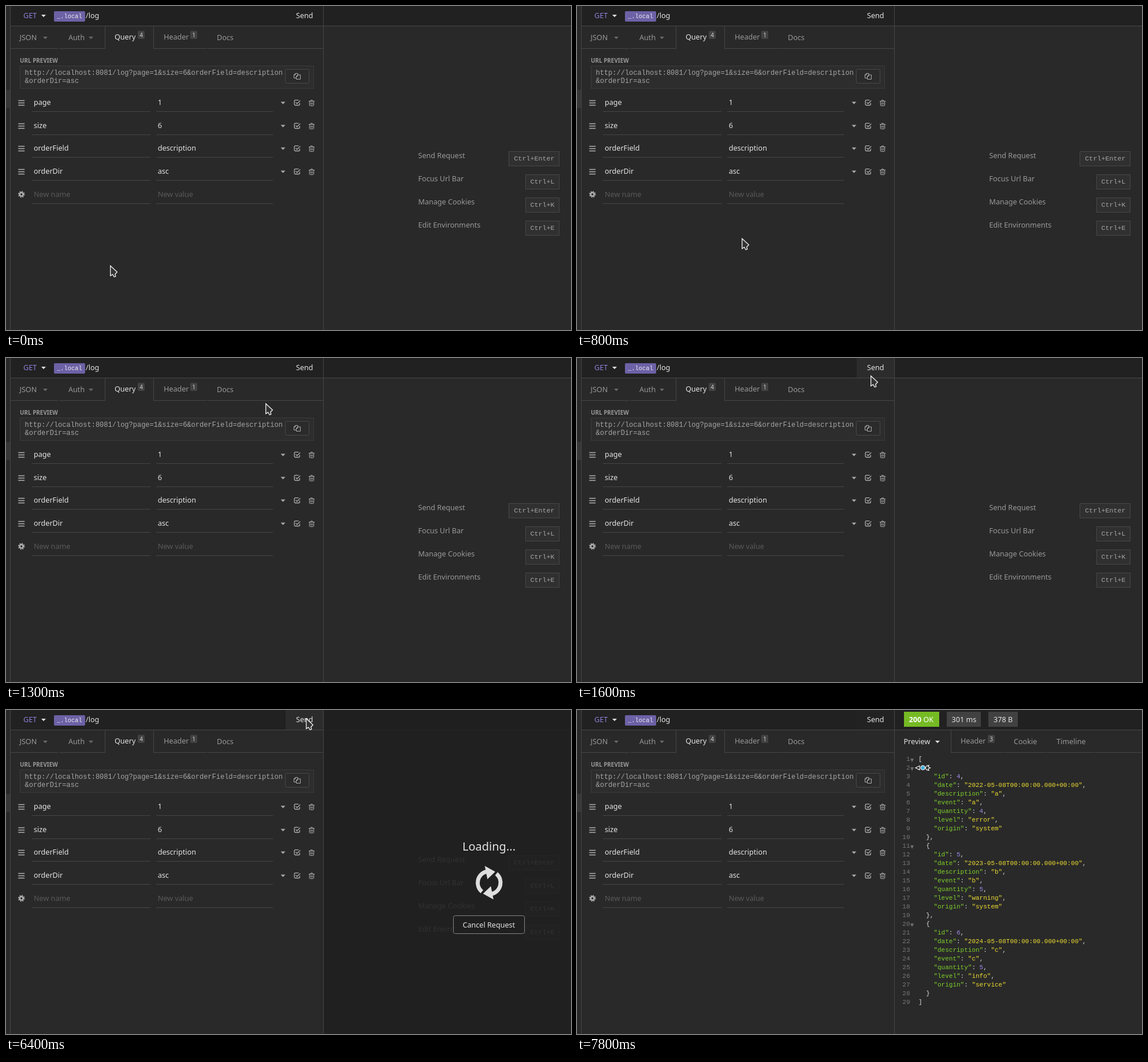
Recreate the animation shown at these times as an HTML page. Size 978x560 px, loop 8000 ms.

```html
<!DOCTYPE html>
<html lang="en">
<head>
<meta charset="utf-8">
<title>Sending a request</title>
<style>
html, body { margin: 0; width: 100%; height: 100%; overflow: hidden; background: #292929; }
svg { display: block; width: 978px; height: 560px; }
text { font: 12.6px "Noto Sans", sans-serif; fill: #999; }
.bright { fill: #e4e4e4; }
.hint { fill: #5a5a5a; }
.label { font-size: 9.9px; font-weight: 700; }
.badge { font-size: 10px; fill: #ccc; text-anchor: middle; }
.mono { font: 12px "Liberation Mono", monospace; fill: #a5a5a5; }
.tag { font-size: 10.4px; fill: #eee; }
.kbd { font-size: 11.7px; text-anchor: end; }
.code { font-size: 11px; fill: #ddd; }
.number { fill: #777; text-anchor: end; }
.key { fill: #7ecf2b; }
.string { fill: #ecdb32; }
.value { fill: #a18aeb; }
.line { fill: none; stroke: #464646; shape-rendering: crispEdges; }
.icon { fill: none; stroke: #b0b0b0; }

.anim { animation: 8s step-end infinite; }
#pointer { animation-name: move; }
#hover { animation-name: hover; }
#loading { animation-name: loading; }
#response { animation-name: response; }
#busy { animation-name: busy; }

/* one pointer step every 100 ms */
@keyframes move {
  0% { transform: translate(180px, 448px); }
  7.5% { transform: translate(196px, 443px); }
  8.75% { transform: translate(240px, 426px); }
  10% { transform: translate(285px, 401px); }
  11.25% { transform: translate(329px, 353px); }
  12.5% { transform: translate(367px, 285px); }
  13.75% { transform: translate(400px, 210px); }
  15% { transform: translate(427px, 136px); }
  16.25% { transform: translate(449px, 78px); }
  17.5% { transform: translate(485px, 53px); }
  18.75% { transform: translate(500px, 39px); }
  20% { transform: translate(508px, 30px); }
  21.25% { transform: translate(513px, 23px); }
  22.5% { transform: translate(516px, 19px); }
  23.75% { transform: translate(518px, 16px); }
  25% { transform: translate(519px, 14px); visibility: visible; }
  97.5%, 100% { transform: translate(519px, 14px); visibility: hidden; }
}
@keyframes hover { 0% { opacity: 0; } 20% { opacity: 1; } 97.5%, 100% { opacity: .2; } }
@keyframes loading { 0% { visibility: hidden; } 80% { visibility: visible; } 86.25%, 100% { visibility: hidden; } }
@keyframes response { 0% { visibility: hidden; } 86.25%, 100% { visibility: visible; } }
@keyframes busy { 0% { visibility: hidden; } 97.5%, 100% { visibility: visible; } }
</style>
</head>
<body>
<svg viewBox="0 0 978 560">
  <defs>
    <path id="caret" d="M-4-2H4L0 2.3Z"/>
    <path id="menu" class="icon" stroke-width="1.4" d="M-5.5-4H5.5M-5.5 0H5.5M-5.5 4H5.5"/>
    <path id="check" class="icon" stroke-width="1.3" d="M4.3 .5V3Q4.3 4.5 2.8 4.5H-3.3Q-4.8 4.5-4.8 3V-2.8Q-4.8-4.3-3.3-4.3H2.5M-2.6-.6L-.2 1.8 5.4-3.6"/>
    <g id="trash" class="icon">
      <path d="M-5-3H5M-1.8-3L-1.3-4.7H1.3L1.8-3M-3.7-3V3.5Q-3.7 5-2.5 5H2.5Q3.7 5 3.7 3.5V-3"/>
      <path d="M-1.7-1V3.2M0-1V3.2M1.7-1V3.2" stroke-width=".8"/>
    </g>
    <g id="gear" class="icon">
      <circle r="3" stroke-width="2.6"/>
      <circle r="4.9" stroke-width="1.8" stroke-dasharray="1.95 1.9"/>
    </g>
    <g id="half" fill="#dedede">
      <path d="M-12.5 15.5A20 20 0 0 1-5-19.2" fill="none" stroke="#dedede" stroke-width="7"/>
      <path d="M-7.5-29L10.5-19-3-6Z"/>
    </g>
  </defs>

  <rect width="978" height="560" fill="#292929"/>
  <rect x="8" width="970" height="34" fill="#212121"/>
  <rect y="145" width="7" height="31" fill="#373737"/>
  <rect id="hover" class="anim" x="484" width="65" height="34" fill="#2c2c2c"/>
  <path class="line" d="M7.5 0V560M549.5 0V560M8 34.5H978M8 73.5H90M92 73.5H171.5V35M255.5 35V73.5H348M349 73.5H549"/>

  <text x="30" y="21" style="fill:#8f7fdb">GET</text>
  <use href="#caret" x="65" y="17" fill="#ddd"/>
  <rect x="83" y="9" width="54" height="18" rx="2" fill="#6d61a6"/>
  <text class="mono tag" x="88" y="21">_.local</text>
  <text class="bright" x="138" y="21">/log</text>
  <text class="bright" x="502" y="21">Send</text>

  <text x="23.5" y="59">JSON</text>
  <use href="#caret" x="68" y="55" fill="#686868"/>
  <text x="108" y="59">Auth</text>
  <use href="#caret" x="147" y="55" fill="#686868"/>
  <text class="bright" x="188" y="58">Query</text>
  <rect x="228" y="43" width="12" height="14" rx="2" fill="#424242"/>
  <text class="badge" x="234" y="54">4</text>
  <text x="273" y="58">Header</text>
  <rect x="319" y="43" width="12" height="14" rx="2" fill="#424242"/>
  <text class="badge" x="325" y="54">1</text>
  <text x="365" y="59">Docs</text>

  <text class="label" x="24" y="98">URL PREVIEW</text>
  <rect x="24.5" y="103.5" width="508" height="39" fill="#2d2d2d" stroke="#3b3b3b"/>
  <text class="mono" x="32.5" y="119">http://localhost:8081/log?page=1&amp;size=6&amp;orderField=description</text>
  <text class="mono" x="32.5" y="133">&amp;orderDir=asc</text>
  <rect x="483.5" y="109.5" width="41" height="24" rx="2" fill="#2b2b2b" stroke="#484848"/>
  <path class="icon" d="M502 124.5H498.500V119L501 116.500H505V119M501 116.500V119H498.500M502.500 126.500V121.500L505 119H509.500V126.500ZM505 119V121.500H502.500"/>

  <g id="rows"></g>
  <g id="shortcuts"></g>

  <g id="loading" class="anim">
    <rect x="550" width="428" height="560" fill="#1f1f1f" opacity=".85"/>
    <text class="bright" x="790" y="243" style="font-size:20px">Loading...</text>
    <g transform="translate(836.3 298.500)">
      <use href="#half"/>
      <use href="#half" transform="rotate(180)"/>
    </g>
    <rect x="774.5" y="355.5" width="123" height="31" rx="3" fill="#1f1f1f" stroke="#858585"/>
    <text class="bright" x="790.5" y="376">Cancel Request</text>
  </g>

  <g id="response" class="anim">
    <rect x="550" width="428" height="560" fill="#292929"/>
    <rect x="550" width="428" height="34" fill="#212121"/>
    <path class="line" d="M550 34.5H978M647.5 35V73.5H739M740 73.5H813M814 73.5H896M897 73.5H978"/>
    <rect x="566" y="3" width="61" height="26" fill="#75ba24"/>
    <text x="574.5" y="21" style="fill:#fff"><tspan font-weight="700">200</tspan> OK</text>
    <rect x="640" y="3" width="59" height="26" fill="#414141"/>
    <text class="bright" x="648.5" y="21">301 ms</text>
    <rect x="712" y="3" width="51" height="26" fill="#414141"/>
    <text class="bright" x="721" y="21">378 B</text>
    <text class="bright" x="565.5" y="59">Preview</text>
    <use href="#caret" x="624" y="55" fill="#ddd"/>
    <text x="664" y="58">Header</text>
    <rect x="711" y="43" width="12" height="14" rx="2" fill="#424242"/>
    <text class="badge" x="717" y="54">3</text>
    <text x="756" y="59">Cookie</text>
    <text x="830" y="59">Timeline</text>
    <g id="code"></g>
  </g>

  <g id="pointer" class="anim">
    <path d="M.7 1V18.300L4.500 16 7.200 20.300 9.800 19.300 8.800 15.500 12.400 11.700Z" fill="#343434" stroke="#f2f2f2" stroke-width="1.3"/>
  </g>
  <g id="busy" class="anim" fill="#222" stroke="#f2f2f2" stroke-width="1.2">
    <path d="M593 96.500L586 100 593 103.500ZM606 96H609L607.500 98 611.500 100 607.500 102 609 104H606Q603.500 102.500 603.500 100T606 96Z"/>
    <circle cx="598.7" cy="99.8" r="3.7" fill="#3fa9dd"/>
  </g>
</svg>
<script>
const fill = (id, items, draw) =>
  document.getElementById(id).innerHTML = items.map(draw).join('');

const params = [['page', '1'], ['size', '6'], ['orderField', 'description'],
  ['orderDir', 'asc'], ['New name', 'New value']];
fill('rows', params, ([name, value], i) => {
  const y = Math.round(167 + i * 39.6), isNew = i === 4;
  const tone = isNew ? 'hint' : 'bright';
  const base = y + (isNew ? 4.5 : 4);
  const rule = Math.floor(182.6 + i * 39.6) + .5;
  const tools = isNew ? '' : `<use href="#caret" x="479.5" y="${y + .5}" fill="#aaa"/>
    <use href="#check" x="504" y="${y}"/><use href="#trash" x="529" y="${y + .5}"/>`;
  return `<use href="#${isNew ? 'gear' : 'menu'}" x="26.700" y="${y + .5}"/>
    <text class="${tone}" x="48" y="${base}">${name}</text>
    <text class="${tone}" x="262.700" y="${base}">${value}</text>
    <path class="line" d="M45 ${rule}H250M260 ${rule}H462"/>${tools}`;
});

const shortcuts = [['Send Request', 'Enter'], ['Focus Url Bar', 'L'],
  ['Manage Cookies', 'K'], ['Edit Environments', 'E']];
fill('shortcuts', shortcuts, ([label, key], i) => {
  const y = 251 + i * 40, width = key.length > 1 ? 87 : 58;
  return `<text x="713.5" y="${y + 12}">${label}</text>
    <rect x="${957.5 - width}" y="${y + .5}" width="${width}" height="25" fill="#303030" stroke="#474747"/>
    <text class="mono kbd" x="949.5" y="${y + 16}">Ctrl+${key}</text>`;
});

const entry = (id, year, letter, quantity, level, origin) => ({
  id, date: `${year}-05-08T00:00:00.000+00:00`,
  description: letter, event: letter, quantity, level, origin
});
const body = [
  entry(4, 2022, 'a', 4, 'error', 'system'),
  entry(5, 2023, 'b', 5, 'warning', 'system'),
  entry(6, 2024, 'c', 5, 'info', 'service')
];
const span = (type, str) => `<tspan class="${type}">${str}</tspan>`;
fill('code', JSON.stringify(body, null, 2).split('\n'), (line, i) => {
  const y = 88 + i * 15, str = line.trim();
  const x = 591 + (line.length - str.length) * 6.6;
  const colored = str.replace(/^("\w+"): (".*"|\d+)/, (_, key, value) =>
    `${span('key', key)}: ${span(value[0] === '"' ? 'string' : 'value', value)}`);
  const fold = /[[{]$/.test(str)
    ? `<path d="M577 ${y - 4}h6l-3 6z" fill="#707070"/>` : '';
  return `<text class="mono code number" x="576.5" y="${y}">${i + 1}</text>${fold}
    <text class="mono code" x="${x}" y="${y}">${colored}</text>`;
});
</script>
</body>
</html>
```
